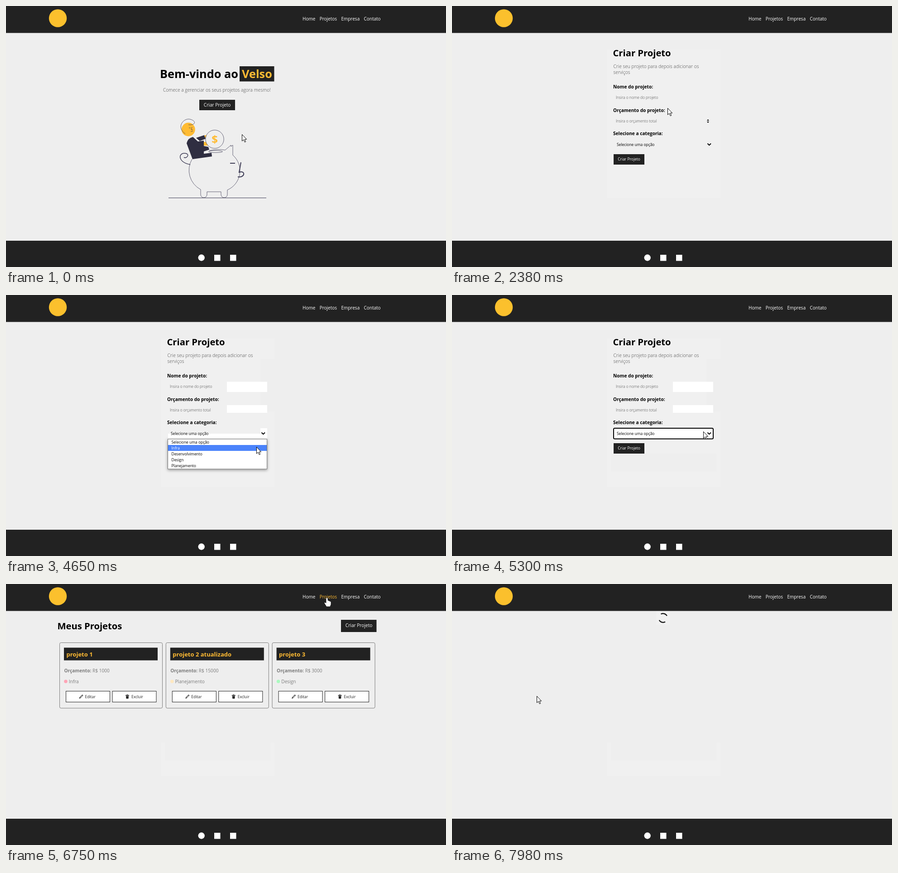
These frames come from a looping animation (972 px wide and 576 px high, 8000 ms). An HTML page:

```html
<!DOCTYPE html>
<html lang="pt">
<head>
<meta charset="utf-8">
<style>
html, body { margin: 0; width: 100%; height: 100%; overflow: hidden; background: #eee; }
svg { display: block; font: 10.13px "Open Sans", sans-serif; }
.bold { font-weight: 700; }
.light { font-weight: 300; font-size: 10.25px; fill: #444; }
.small { font-size: 8.44px; }
.title { font-size: 20.2px; font-weight: 700; }
.hero { font-size: 25.3px; font-weight: 700; }
.gold { fill: #ffbb33; }
.grey { fill: #7b7b7b; }
.white { fill: #fff; }
.dark { fill: #222; }
.navy { fill: #2f2e41; }
.line { fill: none; stroke: #3f3d56; stroke-width: .8; }
.thick { stroke-width: 2; }
</style>
</head>
<body>
<svg width="972" height="576" viewBox="0 0 972 576">
  <rect width="972" height="576" fill="#eee"/>
  <rect width="972" height="59.5" class="dark"/>
  <rect y="518" width="972" height="58" class="dark"/>
  <circle cx="114.5" cy="27" r="19.7" fill="#fbc02d"/>
  <text x="655" y="31.6" class="white" font-size="10" font-weight="500">
    <tspan>Home</tspan><tspan dx="9.3" id="link">Projetos</tspan><tspan dx="9.3">Empresa</tspan><tspan dx="9.3">Contato</tspan>
  </text>
  <g class="white">
    <circle cx="431.7" cy="555.5" r="7.2"/>
    <rect x="460" y="549" width="13.5" height="13.5"/>
    <rect x="495" y="549" width="13.5" height="13.5"/>
  </g>

  <g id="home">
    <text x="340" y="159" class="hero">Bem-vindo ao</text>
    <rect x="516" y="133" width="76.5" height="33.5" class="dark"/>
    <text x="521" y="159" class="hero gold">Velso</text>
    <text x="347" y="188.7" class="light">Comece a gerenciar os seus projetos agora mesmo!</text>
    <rect x="427" y="207" width="79" height="23" class="dark"/>
    <text x="436.8" y="222.4" id="cta">Criar Projeto</text>
    <g class="line">
      <path d="M359 423.5H575" stroke-width="1"/>
      <path d="M411 338A48 48 0 0 0 430 405V416A7 7 0 0 0 444 416V410H475V416A7 7 0 0 0 489 416V406A46 46 0 0 0 501 329V307L497 310V307L484 318Q470 315 449 319"/>
      <ellipse cx="463" cy="321.3" rx="15.5" ry="2.3"/>
      <path class="thick" d="M495 347H506M519 345L515 367C530 362 528 380 512 377"/>
      <path style="stroke-width:1.5" d="M407 350C380 345 380 325 394 325S400 338 393 334"/>
    </g>
    <circle cx="402.8" cy="272.5" r="15" class="gold"/>
    <path class="line" d="M396 282C375 268 392 246 407 250S418 264 403 262M404 269H408M411 267L409 273H413M408 277L413 276"/>
    <path class="navy" d="M399 303Q402 291 413 289L424 299L437 297V309L447 311L449 317L437 321V326L454 324L455 332L412 338Z"/>
    <path class="navy" d="M420 291L438 285L441 293L428 298Z"/>
    <path class="gold" d="M438 286L445 284V291L441 292ZM437 300H446V308H437Z"/>
    <circle cx="461" cy="294" r="20.2" class="line" style="fill:#eee"/>
    <text x="461" y="302.5" class="bold gold" font-size="24" text-anchor="middle">$</text>
  </g>

  <g id="form">
    <rect x="342" y="96" width="251" height="328" fill="#f0f0f0"/>
    <g id="worn">
      <path fill="#eee" d="M562 141H593V257H562Z"/>
      <path class="white" d="M488 191.500H577V214H488ZM488 243H577V260H488Z"/>
    </g>
    <text x="355.5" y="111" class="title">Criar Projeto</text>
    <text x="356.5" y="136.6" class="light">Crie seu projeto para depois adicionar os</text>
    <text x="356.5" y="149.6" class="light">serviços</text>
    <path id="spin" d="M563 253L565.500 250L568 253ZM563 255L565.500 258L568 255Z"/>
    <rect id="focus" x="357" y="294" width="220" height="23.5" rx="2.5" fill="#fff" stroke="#000" stroke-width="2"/>
    <path id="strip" class="white" d="M358 306H562V294H577V318H358Z"/>
    <g id="fields"></g>
    <path d="M564.500 303.500L568.300 307.200L572 303.500" fill="none" stroke="#000" stroke-width="2"/>
    <rect x="357" y="327" width="68" height="23" class="dark"/>
    <text x="366.3" y="341.4" class="small white" font-weight="500">Criar Projeto</text>
    <g id="list">
      <rect x="357.5" y="318" width="219" height="66" fill="#fff" stroke="#767676" style="filter:drop-shadow(0 2px 3px #0006)"/>
      <rect id="pick" x="358" width="218" height="13" fill="#4a83fb"/>
    </g>
  </g>

  <g id="ghost">
    <rect x="342" y="350" width="251" height="74" fill="#f0f0f0"/>
    <rect x="351" y="350" width="233" height="40" fill="#eee"/>
  </g>

  <g id="projects">
    <text x="113.5" y="100" class="title">Meus Projetos</text>
    <rect x="740" y="79" width="78.5" height="27" class="dark"/>
    <text x="749.8" y="95" class="white">Criar Projeto</text>
    <g id="cards"></g>
  </g>

  <g id="loader">
    <rect x="-15" y="-15" width="30" height="30" fill="#f1f1f1"/>
    <circle id="ring" r="9.8" pathLength="4" stroke-dasharray="1" fill="none" stroke="#111" stroke-width="2.2"/>
  </g>

  <g id="cursor" fill="#fff" stroke="#000" stroke-linejoin="round">
    <path id="arrow" d="M.5 .5V15L4 12L6.400 17.500L8.600 16.500L6.300 11.200H10.600Z"/>
    <path id="hand" stroke-width=".7" d="M-2 1.500Q0 -1 2 1.500V6L9 9V15L7 20H-1L-6 12Q-5 9 -2 12Z"/>
  </g>
</svg>
<script>
const $ = id => document.getElementById(id);
const show = (id, on) => $(id).style.display = on ? '' : 'none';

$('fields').innerHTML = [
  ['Nome do projeto:', 'Insira o nome do projeto'],
  ['Orçamento do projeto:', 'Insira o orçamento total'],
  ['Selecione a categoria:', 'Selecione uma opção']
].map(([label, hint], i) => `
  <g transform="translate(356 ${182.2 + 51.6 * i})">
    <text class="bold">${label}</text>
    <text x="${i < 2 ? 6 : 8}" y="23.3" class="small" ${i < 2 ? 'fill="#444" font-weight="300"' : ''}>${hint}</text>
  </g>`).join('');

$('list').insertAdjacentHTML('beforeend',
  ['Selecione uma opção', 'Infra', 'Desenvolvimento', 'Design', 'Planejamento'].map((name, i) =>
    `<text class="small option" x="365.5" y="${327.5 + 13 * i}">${name}</text>`).join(''));

const button = (x, label, icon) => `
  <g transform="translate(${x} 107)" class="button dark">
    <rect width="97" height="24" fill="#fff" stroke="#222"/>
    <path transform="translate(29 7.500)" d="${icon}"/>
    <text x="42" y="15" class="small">${label}</text>
  </g>`;
const pencil = 'M0 9L1 6L7 0L9 2L3 8ZM2 6.500L3 7L7.500 2.500L7 1.500Z';
const trash = 'M0 1H2.500V0H5.500V1H8V2.500H0ZM1 3.200H7L6.500 9H1.500Z';

$('cards').innerHTML = [
  ['projeto 1', 1000, 'Infra', '#ffa4b6'],
  ['projeto 2 atualizado', 15000, 'Planejamento', '#ffe8c0'],
  ['projeto 3', 3000, 'Design', '#aafabf']
].map(([name, budget, kind, color], i) => `
  <g transform="translate(${118.5 + 234.8 * i} 129.500)">
    <rect width="227" height="144.5" rx="3" fill="none" stroke="#7b7b7b"/>
    <rect x="9.5" y="11" width="207" height="28" class="dark"/>
    <text x="15" y="30.5" class="bold gold" font-size="13">${name}</text>
    <text x="10" y="65.8" class="grey"><tspan class="bold">Orçamento:</tspan> R$ ${budget}</text>
    <circle cx="13.5" cy="85.5" r="3.8" fill="${color}"/>
    <text x="20.2" y="89.2" class="grey">${kind}</text>
    ${button(14, 'Editar', pencil)}
    ${button(116.5, 'Excluir', trash)}
  </g>`).join('');
const edit = document.querySelector('.button');
const options = document.querySelectorAll('.option');
edit.firstElementChild.style.fill = '#fff';

// The screen was sampled at a fixed interval, so motion advances in steps
const TICK = 127.5;
const ticksLeft = (end, t) => Math.max(0, Math.ceil((end - t) / TICK));

// Pointer moves: arrival time, number of ticks, destination
const moves = [
  [1190, 6, 482, 228], [2000, 3, 478, 224], [2380, 2, 476, 225], [2960, 1, 560, 239],
  [3350, 3, 649, 122], [3830, 4, 563, 299], [4520, 4, 556, 359], [4650, 1, 553, 335],
  [4920, 2, 555, 301], [6070, 5, 709, 30], [7530, 4, 196, 244], [7830, 2, 187, 247]
];

function pointer(t) {
  let x = 521, y = 283;
  for (const [end, ticks, toX, toY] of moves) {
    const left = Math.min(1, ticksLeft(end, t) / ticks);
    const p = 1 - left * left;
    x += (toX - x) * p;
    y += (toY - y) * p;
  }
  return [x, y];
}

function draw(now) {
  const t = now % 8000, within = (a, b) => t >= a && t < b;
  const [x, y] = pointer(t);
  const over = (left, top, w, h) => x >= left && x <= left + w && y >= top && y <= top + h;

  const onHome = t < 2250, onForm = within(2250, 6350), onProjects = within(6350, 7830);
  show('home', onHome);
  show('form', onForm);
  show('projects', onProjects);
  show('cards', t >= 6750);
  show('worn', t >= 2960);
  show('spin', t < 2960);
  show('strip', t < 5300 && t >= 3990);
  show('list', within(3990, 5300));
  show('focus', t >= 5300);
  show('ghost', t >= 5300);

  const onLink = over(693, 18, 39, 20);
  const onCta = onHome && over(427, 207, 79, 23);
  const onEdit = onProjects && over(132, 236, 97, 25);
  show('hand', onLink || onCta || onEdit);
  show('arrow', !(onLink || onCta || onEdit));
  $('cursor').setAttribute('transform', `translate(${x} ${y})`);

  const fade = 1 - Math.min(1, ticksLeft(1490, t) / 3);
  $('cta').style.fill = `rgb(255 ${255 - 68 * fade} ${255 - 204 * fade})`;
  $('link').style.fill = onLink ? '#ffbb33' : '';

  const row = Math.max(0, Math.floor((y - 318) / 13));
  $('pick').setAttribute('y', 318 + 13 * row);
  options.forEach((o, i) => o.style.fill = i === row ? '#fff' : '#000');

  const lit = t >= 7680;
  edit.style.fill = lit ? '#ffbb33' : '';
  edit.firstElementChild.style.fill = lit ? '#222' : '#fff';

  show('loader', within(6350, 6750) || t >= 7830);
  $('loader').setAttribute('transform', `translate(466.3 ${onProjects ? 145 : 75})`);
  $('ring').setAttribute('transform', `rotate(${61 - ticksLeft(7980, t) * TICK * .36})`);
  requestAnimationFrame(draw);
}
draw(performance.now());
</script>
</body>
</html>
```
